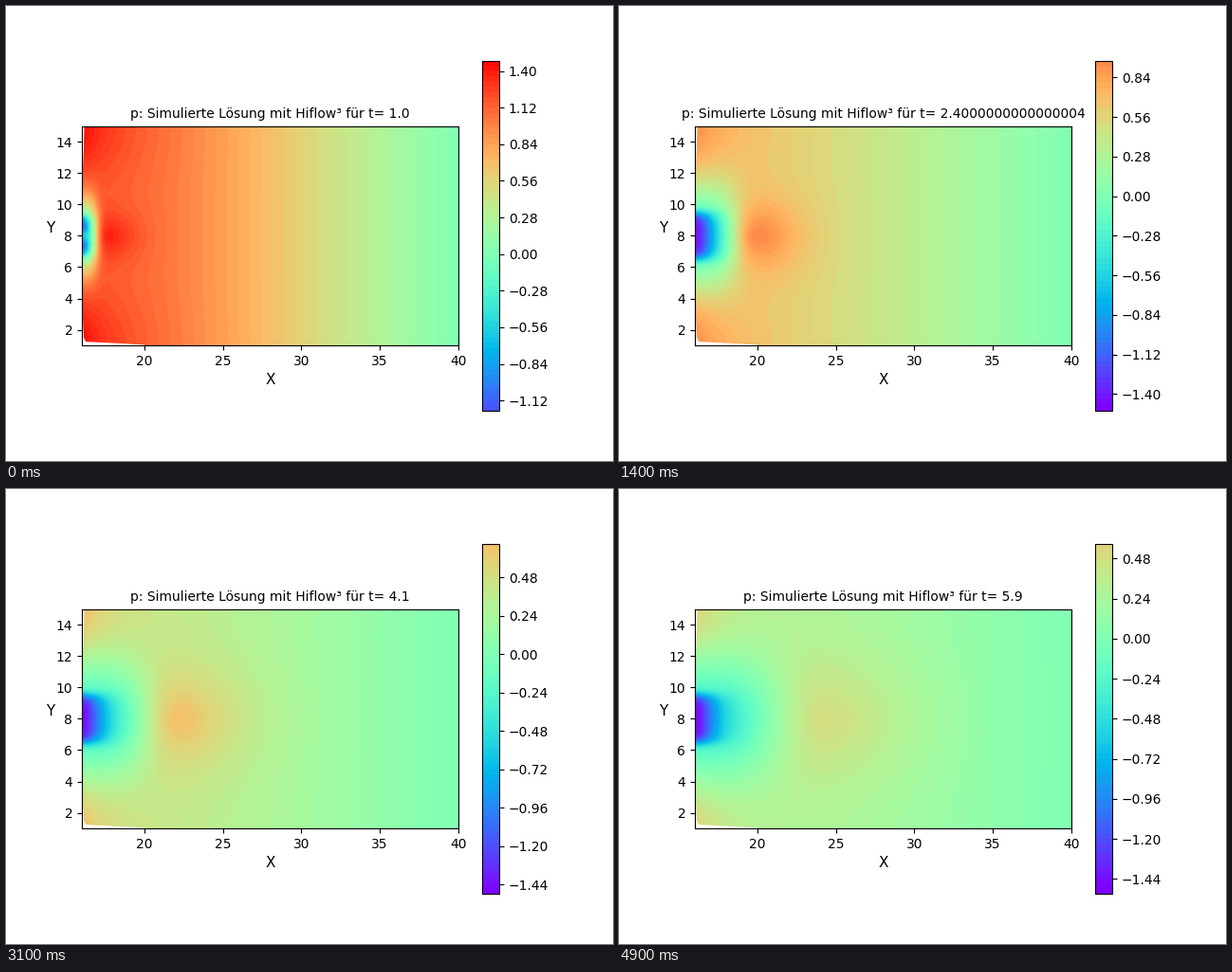
Write a matplotlib script that moves like this. It is 640 by 480 pixels and loops after 5000 ms.

```python
import numpy as np
import matplotlib.pyplot as plt
from matplotlib.animation import FuncAnimation

FRAMES = 50
INTERVAL = 100

plt.rcParams["font.family"] = "DejaVu Sans"
fig = plt.figure(figsize=(6.4, 4.8), dpi=100)

x = 16 + 24 * np.linspace(0, 1, 221) ** 1.3
y = np.linspace(1, 15, 141)
X, Y = np.meshgrid(x, y)
U = X - 16            # distance from the inlet
V = np.abs(Y - 8)     # distance from the jet axis

# Gaps between the mesh hull and the axes box
LEFT_GAP = [(16, 15), (16.15, 15), (16.12, 13.5), (16, 11)]
BOTTOM_GAP = [(16, 4), (16.12, 1.5), (16.25, 1.24), (18.3, 1.14),
              (20, 1.04), (20, 1), (16, 1)]


def relax(t, start, end, tau):
    """Exponential approach from start (at t = 1) to end."""
    return end + (start - end) * np.exp(-(t - 1) / tau)


def pressure(t):
    age = t - 1
    high = relax(t, 1.46, 0.499, 1.87)
    low = relax(t, -1.18, -1.475, 0.2) - 0.008 * age

    # Linear drop towards the outlet, levelling off near the inlet
    slope = relax(t, 0.056, 0.014, 1.9)
    reach = 20.5 - age
    plateau = slope * reach
    to_outlet = 40 - X
    p = slope * (to_outlet - 2 * np.logaddexp(0, (to_outlet - reach) / 2))

    # High pressure in the inlet corners
    p += 0.3 * np.exp(-U / 2.2 - ((7 - V) / 3) ** 2)

    # Stagnation zone travelling ahead of the jet
    dx = X - (17.6 + 1.35 * age)
    width = np.where(dx < 0, 0.8 + 0.35 * age, 1.8 + 0.8 * age)
    height = 1.3 + 0.55 * age
    front = 0.68 * np.exp(-age / 4.6) - 0.43 * np.exp(-age / 0.9)
    p += front * np.exp(-((dx / width) ** 2 + (V / height) ** 2) ** 0.8)

    # Suction at the inlet: wide halo and steep core
    p -= (plateau + 0.42) * np.exp(-(U / relax(t, 1.0, 5.8, 3)) ** 3
                                   - (V / relax(t, 2.2, 3.8, 2)) ** 2)
    dip = 1 - relax(t, 0.85, 0.02, 0.4) * np.exp(-(V / 0.45) ** 2)
    p += (low + 0.42) * dip * np.exp(-(U / relax(t, 0.5, 1.4, 0.8)) ** 1.6
                                     - (V / relax(t, 1.4, 1.65, 0.8)) ** 6)

    return np.where(p < 0, p * low / p.min(), p * high / p.max())


def draw(i):
    t = 1 + i * 0.1
    fig.clear()
    ax = fig.add_subplot()
    field = ax.contourf(X, Y, pressure(t), 80, cmap="rainbow",
                        vmin=-1.5, vmax=1.5)
    for gap in (LEFT_GAP, BOTTOM_GAP):
        ax.fill(*zip(*gap), color="white", lw=0)
    ax.set_aspect("equal")
    ax.set_xlim(16, 40)
    ax.set_ylim(1, 15)
    ax.set_xlabel("X", fontsize=11)
    ax.set_ylabel("Y", fontsize=11, rotation=0)
    ax.set_title(f"p: Simulierte Lösung mit Hiflow³ für t= {t}", fontsize=10)
    fig.colorbar(field, ax=ax)


animation = FuncAnimation(fig, draw, frames=FRAMES, interval=INTERVAL,
                          repeat=True, repeat_delay=0)
plt.show()
```
